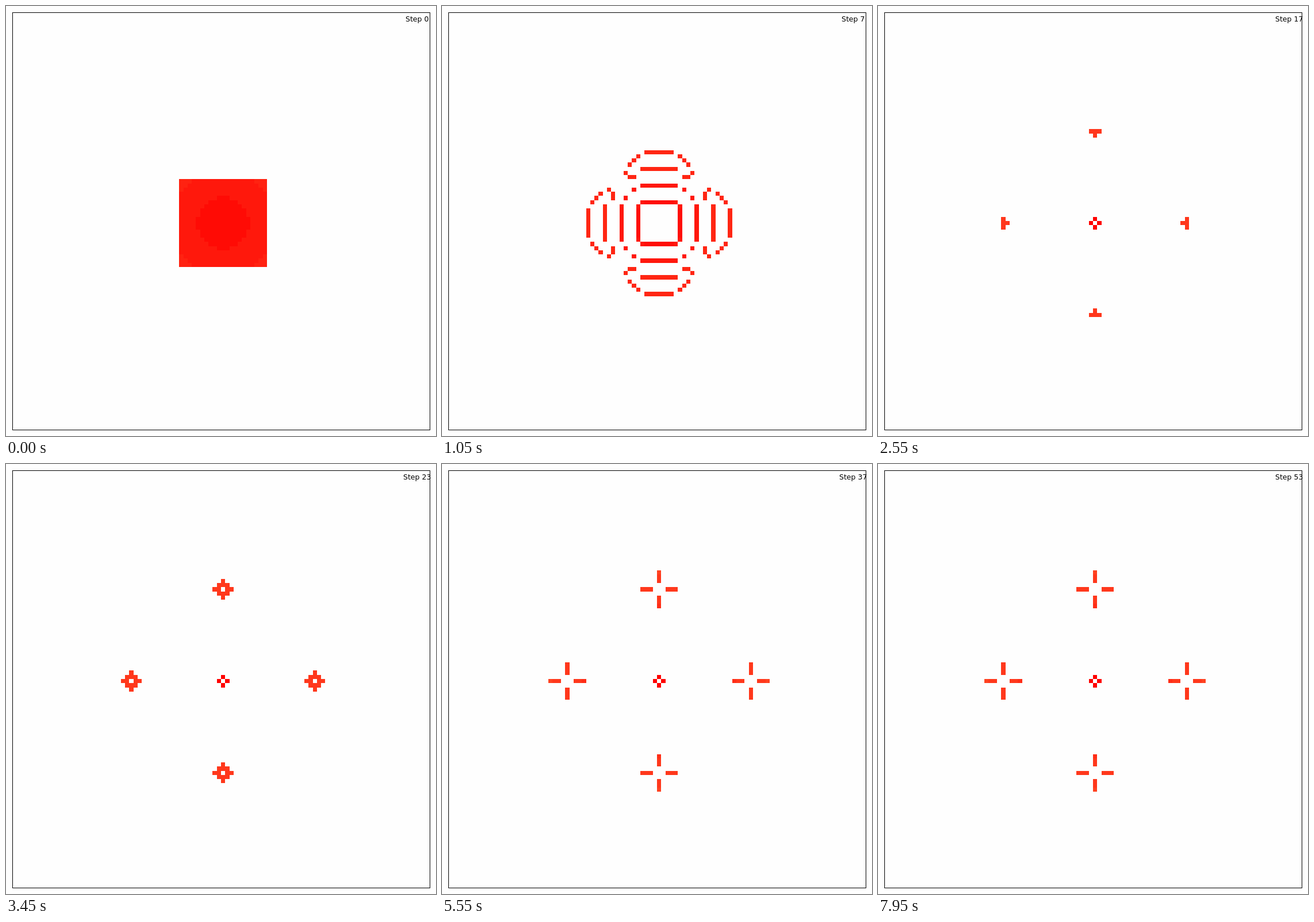
These frames come from a looping animation (748 px wide and 748 px high, 8 s). An HTML page with a canvas:

```html
<!DOCTYPE html>
<html lang="en">
<head>
<meta charset="utf-8">
<title>Game of Life</title>
<style>
  html, body { margin: 0; width: 100%; height: 100%; overflow: hidden; background: #fefefe; }
  canvas, svg { position: absolute; left: 0; top: 0; width: 748px; height: 748px; }
  text { font: 12.5px "DejaVu Sans", sans-serif; text-anchor: middle; }
</style>
</head>
<body>
<canvas id="board" width="748" height="748"></canvas>
<svg viewBox="0 0 748 748">
  <rect x="11.5" y="11.5" width="726" height="726" fill="none" stroke="#000"/>
  <text id="label" x="715.2" y="27">Step 0</text>
</svg>
<script>
const SIZE = 100, MID = 50, HALF = 10;
const STEP_MS = 150, LOOP_MS = 8000;
const ORIGIN = 10.98, CELL = 7.26;

const ctx = document.getElementById('board').getContext('2d');
const label = document.getElementById('label');
const edge = i => Math.round(ORIGIN + i * CELL);

function seed() {
  const grid = new Uint8Array(SIZE * SIZE);
  for (let y = MID - HALF; y <= MID + HALF; y++)
    for (let x = MID - HALF; x <= MID + HALF; x++) grid[y * SIZE + x] = 1;
  return grid;
}

function evolve(grid) {
  const next = new Uint8Array(grid.length);
  for (let y = 1; y < SIZE - 1; y++) {
    for (let x = 1; x < SIZE - 1; x++) {
      const i = y * SIZE + x;
      let n = -grid[i];
      for (let dy = -SIZE; dy <= SIZE; dy += SIZE)
        n += grid[i + dy - 1] + grid[i + dy] + grid[i + dy + 1];
      next[i] = n === 3 || (n === 2 && grid[i]) ? 1 : 0;
    }
  }
  return next;
}

// Red end of a rainbow ramp, by distance from the centre
const ramp = d => {
  const t = d * 0.0032;
  return [255 * Math.sin(Math.PI * t), 255 * Math.sin(Math.PI * t / 2)];
};

// Group live cells into colour bands; each band takes its mean colour
function bands(grid) {
  const out = [];
  grid.forEach((alive, i) => {
    if (!alive) return;
    const x = i % SIZE, y = Math.floor(i / SIZE);
    const [g, b] = ramp(Math.hypot(x - MID, y - MID));
    const band = out[g >> 4] ||= { g: 0, b: 0, cells: [] };
    band.g += g;
    band.b += b;
    band.cells.push([x, y]);
  });
  return out;
}

const steps = [];
for (let grid = seed(), n = 0; n < Math.ceil(LOOP_MS / STEP_MS); n++) {
  steps.push(bands(grid));
  grid = evolve(grid);
}

function draw(n) {
  ctx.fillStyle = '#fefefe';
  ctx.fillRect(0, 0, 748, 748);
  steps[n].forEach(({ g, b, cells }) => {
    const mean = v => Math.round(v / cells.length);
    ctx.fillStyle = `rgb(255,${mean(g)},${mean(b)})`;
    for (const [x, y] of cells)
      ctx.fillRect(edge(x), edge(y), edge(x + 1) - edge(x), edge(y + 1) - edge(y));
  });
  label.textContent = 'Step ' + n;
}

let shown = -1;
const start = performance.now();
function tick() {
  const n = Math.floor(((performance.now() - start) % LOOP_MS) / STEP_MS);
  if (n !== shown) draw(shown = n);
  requestAnimationFrame(tick);
}
tick();
</script>
</body>
</html>
```
